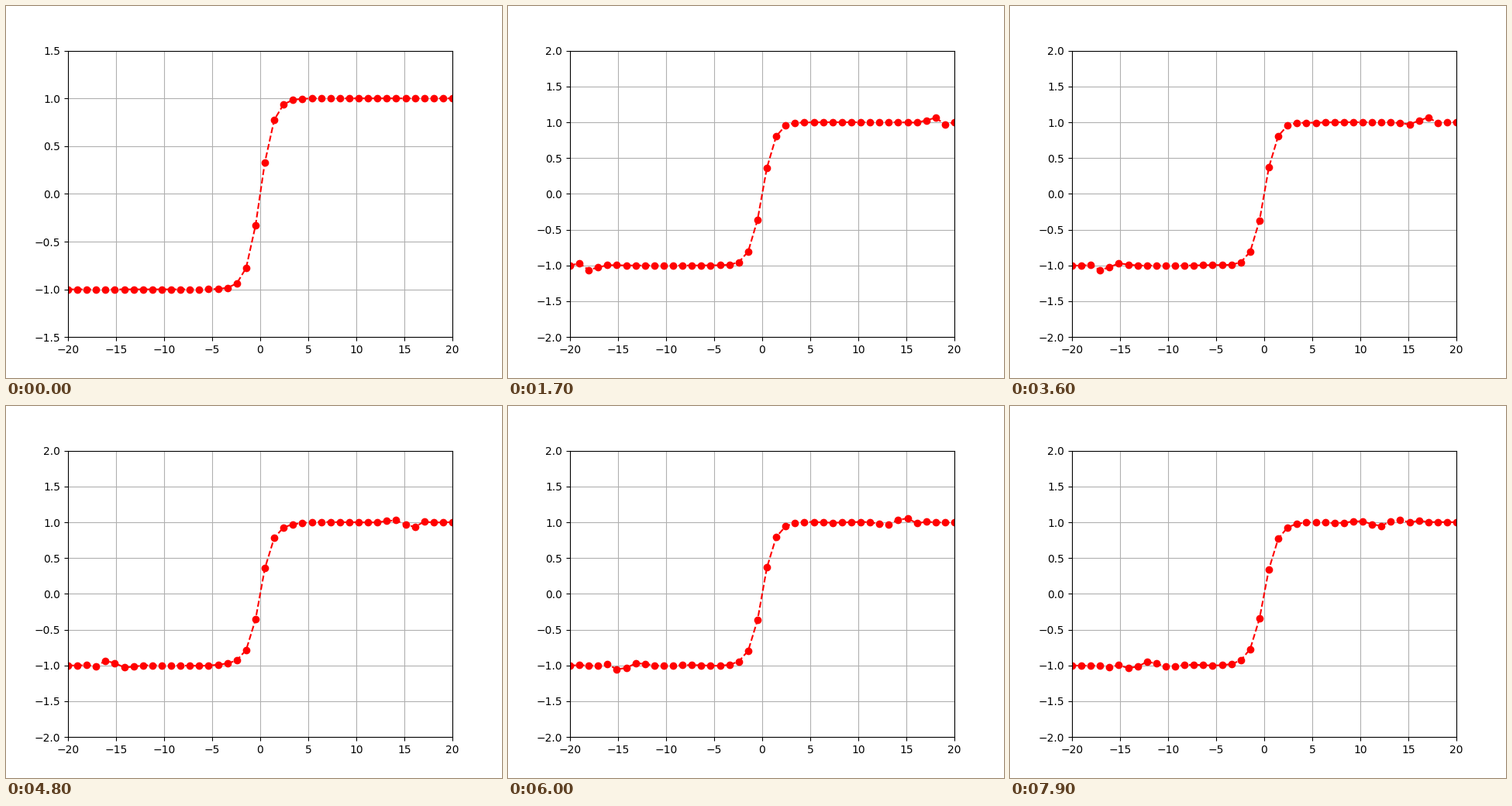
A matplotlib script for the animation above (8 s loop, 640 px wide and 480 px high).

```python
import numpy as np
import matplotlib.pyplot as plt
from matplotlib.animation import FuncAnimation

FRAMES, INTERVAL = 80, 100
POINTS, HALF = 42, 20
DT = 0.2

x = np.linspace(-HALF, HALF, POINTS)
dx = x[1] - x[0]


def force(phi):
    """Acceleration of the interior points: phi_xx + phi - phi^3."""
    mid = phi[1:-1]
    return (phi[2:] - 2 * mid + phi[:-2]) / dx**2 + mid - mid**3


def evolve(steps):
    """Leapfrog a kink at rest between walls fixed at -1 and +1."""
    start = np.tanh(x / np.sqrt(2))
    history = [start]
    now, old = start.copy(), start
    now[[0, -1]] = 0  # walls are still open in the first step, which kicks the edges
    for _ in range(steps - 1):
        new = np.empty_like(now)
        new[1:-1] = 2 * now[1:-1] - old[1:-1] + DT**2 * force(now)
        new[0], new[-1] = -1, 1
        history.append(new)
        old, now = now, new
    return history


history = evolve(FRAMES)

fig, ax = plt.subplots(figsize=(6.4, 4.8), dpi=100)
ax.set_xlim(-HALF, HALF)
ax.grid(True)
line, = ax.plot(x, history[0], "ro--")


def update(i):
    top = 2 if i else 1.5
    ax.set_ylim(-top, top)
    line.set_ydata(history[i])
    return line,


anim = FuncAnimation(fig, update, frames=FRAMES, interval=INTERVAL,
                     repeat=True, repeat_delay=0)
plt.show()
```
